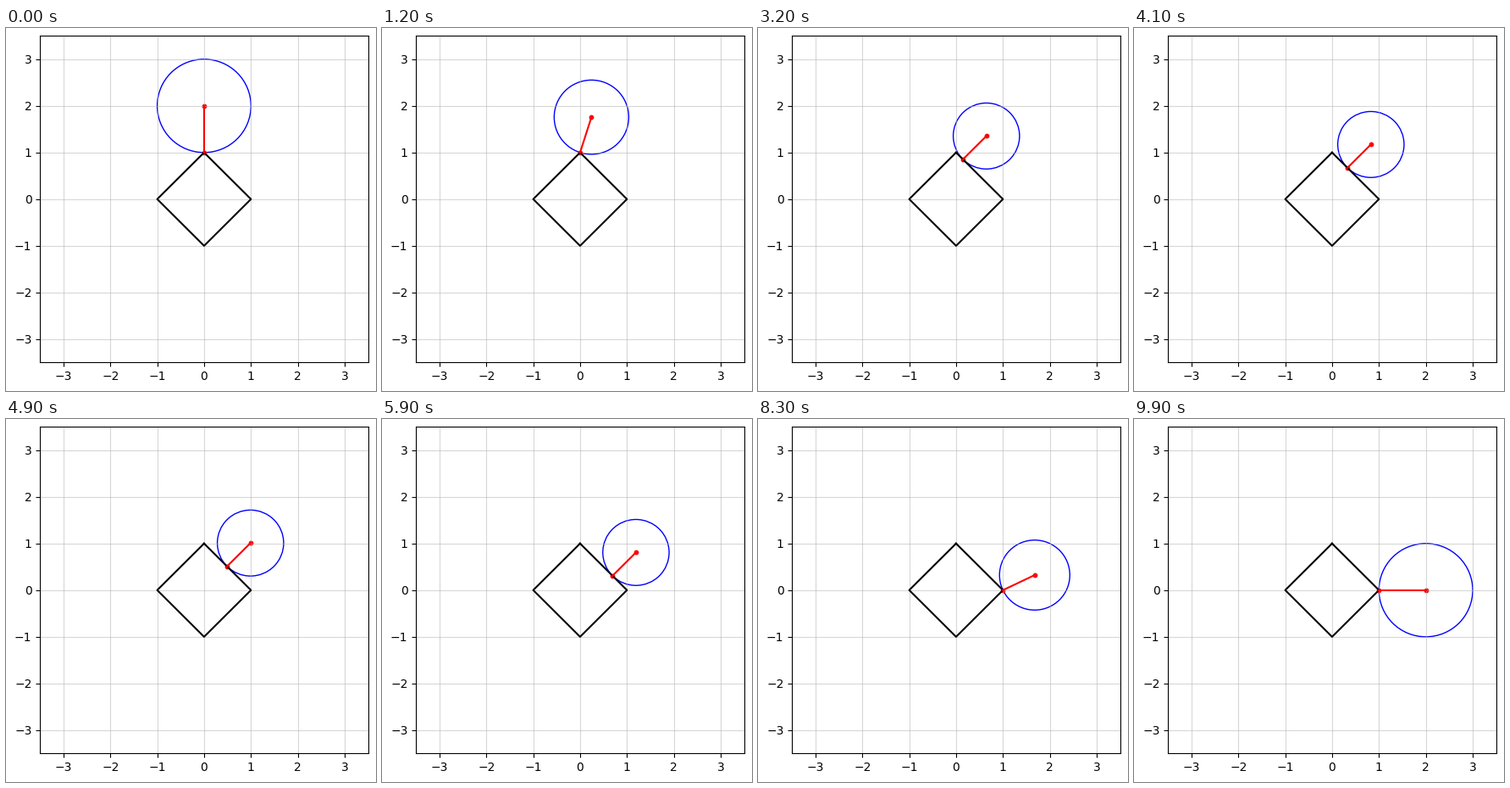
Write a matplotlib script that moves like this. It is 437x428 px and loops after 10 s.

```python
import numpy as np
import matplotlib.pyplot as plt
from matplotlib.animation import FuncAnimation

W, H, DPI = 437, 428, 100
FRAMES, INTERVAL = 100, 100
START, END = np.array([0.0, 2.0]), np.array([2.0, 0.0])
TOP, RIGHT = np.array([0.0, 1.0]), np.array([1.0, 0.0])


def closest_point(p, a, b):
    """Point of segment ab nearest to p."""
    ab = b - a
    return a + ab * np.clip((p - a) @ ab / (ab @ ab), 0, 1)


fig = plt.figure(figsize=(W / DPI, H / DPI), dpi=DPI)
ax = fig.add_axes([40.2 / W, 33.7 / H, 387.5 / W, 385 / H])
ax.set_xlim(-3.5, 3.5)
ax.set_ylim(-3.5, 3.5)
ax.set_xticks(range(-3, 4))
ax.set_yticks(range(-3, 4))
ax.grid(alpha=0.5)

ax.plot([0, 1, 0, -1, 0], [1, 0, -1, 0, 1], color="black", lw=1.5)
circle = plt.Circle(START, 1, fill=False, edgecolor="blue", lw=1)
ax.add_patch(circle)
dots = ax.scatter([0, 0], [2, 1], s=10, color="red")
radius_line, = ax.plot([], [], color="red", lw=1.5)


def update(i):
    center = START + (END - START) * i / (FRAMES - 1)
    contact = closest_point(center, TOP, RIGHT)
    ends = np.array([center, contact])
    circle.center = center
    circle.radius = np.hypot(*(center - contact))
    dots.set_offsets(ends)
    radius_line.set_data(ends[:, 0], ends[:, 1])
    return circle, dots, radius_line


anim = FuncAnimation(fig, update, frames=FRAMES, interval=INTERVAL,
                     repeat=True, repeat_delay=0)
plt.show()
```
